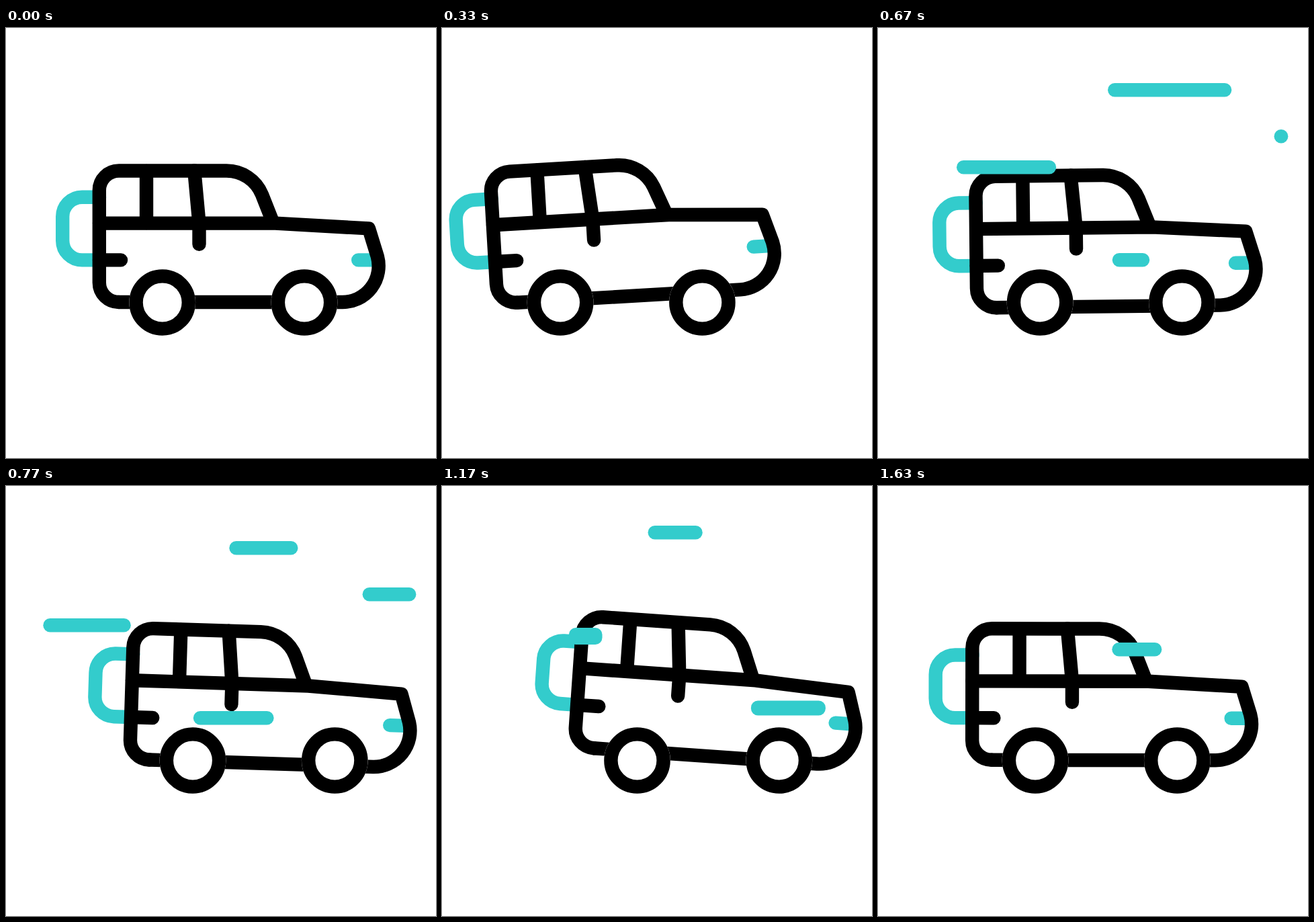
Recreate the animation shown at these times as an HTML page. Size 640 by 640 pixels, loop 1.67 s.

```html
<!DOCTYPE html>
<html lang="en">
<head>
<meta charset="utf-8">
<title>Off-road car</title>
<style>
  html, body { margin: 0; width: 100%; height: 100%; overflow: hidden; background: #fff; }
  svg { display: block; width: 100vw; height: 100vh; }
  .stroke { fill: none; stroke: #000; stroke-width: 20.4; stroke-linecap: round; stroke-linejoin: round; }
  .teal { stroke: #33cccc; }
  .streak { fill: #33cccc; }
</style>
</head>
<body>
<svg viewBox="0 0 640 640">
  <g id="car">
    <g id="body" class="stroke">
      <path class="teal" d="M139 251.7H113.2a29 29 0 0 0-29 29V316.4a29 29 0 0 0 29 29H139M524.2 345.4H548"/>
      <path d="M168 408a29.2 29 0 0 1-29.2-29V241.5a29.2 29 0 0 1 29.2-29H328A57 57 0 0 1 381 248L396 286"/>
      <path d="M139 290.6H401L540 298.4L552.8 340A54 54 0 0 1 501 408H168"/>
      <path d="M209 213V290M280.3 212.5L287.5 291V321.7M139 345.4H171"/>
    </g>
    <g id="wheels"></g>
  </g>
  <g id="streaks"></g>
</svg>
<script>
const LOOP = 1670, FRAMES = 50, WEIGHT = 20.4;
const $ = id => document.getElementById(id);

function add(parent, tag, attrs) {
  const el = document.createElementNS("http://www.w3.org/2000/svg", tag);
  for (const key in attrs) el.setAttribute(key, attrs[key]);
  return parent.appendChild(el);
}

const progress = (n, start, end) => Math.min(1, Math.max(0, (n - start) / (end - start)));

// Goes from 0 to 1 between two frames; the slopes at both ends are zero by default
function ease(n, start, end, slopeIn = 0, slopeOut = 0) {
  const u = progress(n, start, end), v = 1 - u;
  return u * u * (3 - 2 * u) + slopeIn * u * v * v - slopeOut * u * u * v;
}

// Rises to 1 halfway and falls back
const hump = (n, start, end) => Math.sin(Math.PI * progress(n, start, end)) ** 2;

// The car backs up, lunges forward, then returns
const drive = n => -62.5 * ease(n, 0, 13, 1) + 120.3 * ease(n, 13, 25.5) - 57.8 * ease(n, 36, 50, .95, .21);
const tilt = n => -4 * ease(n, 0, 13.5) + 8 * ease(n, 13.5, 28) - 4 * ease(n, 38, 50);
const lift = n => -8.5 * ease(n, 0, 13.5) + 15.7 * hump(n, 13.5, 28) + 8.5 * ease(n, 34, 45);

for (const cx of [232.7, 444]) {
  add($("wheels"), "circle", { cx, cy: 408.5, r: 49.4, fill: "#fff" });
  add($("wheels"), "circle", { cx, cy: 408.5, r: 39.1, class: "stroke" });
}

// A streak's head runs left, and its tail follows along the same way
function streak({ y, from, start, span, travel = 200, height = WEIGHT }) {
  const el = add($("streaks"), "rect", { y: y - height / 2, height, rx: WEIGHT / 2, class: "streak" });
  const follow = start + 8 - span / 4;
  return n => {
    const at = begin => from - travel * ease(n, begin, begin + span);
    const head = at(start), tail = at(follow);
    el.setAttribute("x", head - WEIGHT / 2);
    el.setAttribute("width", tail - head + WEIGHT);
    el.style.display = n > start && n < follow + span ? "" : "none";
  };
}

const streaks = [
  { y: 92.2, from: 542.5, start: 12.2, span: 9 },
  { y: 207.2, from: 300, start: 11.7, span: 13, travel: 246 },
  { y: 345.3, from: 394, start: 16.8, span: 12 },
  { y: 161.2, from: 600.2, start: 19.75, span: 9 },
  { y: 330.5, from: 561, start: 29.6, span: 11.5, height: 22 },
  { y: 69.2, from: 379, start: 29.8, span: 14 },
  { y: 223.4, from: 228.3, start: 32.3, span: 11.2, height: 25 },
  { y: 243.2, from: 558.5, start: 36.9, span: 10 }
].map(streak);

function draw(n) {
  $("car").setAttribute("transform", `translate(${drive(n)} 0)`);
  $("body").setAttribute("transform", `translate(0 ${lift(n)}) rotate(${tilt(n)} 303 405)`);
  for (const update of streaks) update(n);
}

const begin = performance.now();

function tick() {
  const t = (performance.now() - begin) % LOOP;
  // Frames start on whole hundredths of a second, up to 4 ms early
  draw(Math.min(FRAMES - 1, Math.floor((t + 4) * .03)));
  requestAnimationFrame(tick);
}

tick();
</script>
</body>
</html>
```
